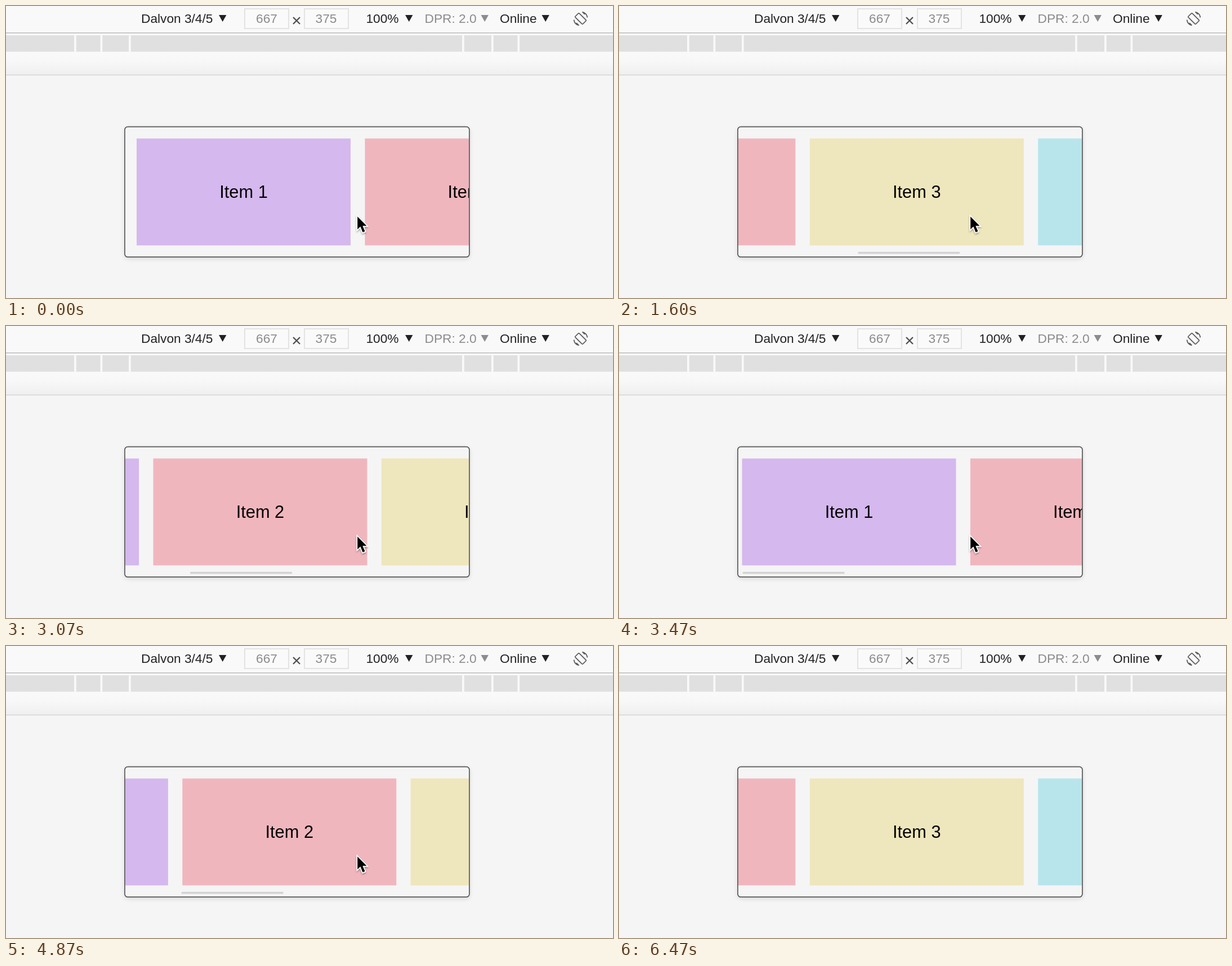
Recreate the animation shown at these times as an HTML page. Size 1078 by 519 pixels, loop 6.74 s.

```html
<!DOCTYPE html>
<html lang="en">
<head>
<meta charset="utf-8">
<title>Scrolling items</title>
<style>
  html, body { margin: 0; width: 100%; height: 100%; overflow: hidden; background: #f5f5f5; }
  svg { display: block; width: 100vw; height: 100vh; }
  text { font-family: "Liberation Sans", Arial, sans-serif; }
  .bar { font-size: 22.7px; fill: #222; }
  .bar .dim { fill: #8c8c8c; }
  .mid, .item { text-anchor: middle; }
  .item { font-size: 30.8px; fill: #000; }
  .box { fill: #fafafa; stroke: #e3e3e3; stroke-width: 2; }
  .icon { fill: none; stroke: #5a5a5a; stroke-width: 1.7; }
</style>
</head>
<body>
<svg viewBox="0 0 1078 519" preserveAspectRatio="none">
  <defs>
    <linearGradient id="fade" x2="0" y2="1">
      <stop offset="0" stop-color="#fafafa"/>
      <stop offset=".45" stop-color="#f7f7f7"/>
      <stop offset="1" stop-color="#efefef"/>
    </linearGradient>
    <clipPath id="view"><rect x="211" y="215" width="611.5" height="231" rx="5"/></clipPath>
    <filter id="soft" x="-10%" y="-10%" width="120%" height="130%">
      <feGaussianBlur stdDeviation="4"/>
    </filter>
    <filter id="drop" x="-50%" y="-50%" width="200%" height="200%">
      <feDropShadow dx="0" dy="2" stdDeviation="1.5" flood-opacity=".35"/>
    </filter>
  </defs>

  <rect width="1078" height="519" fill="#f5f5f5"/>
  <rect width="1078" height="82" fill="#f9f9f9"/>
  <rect y="47" width="1078" height="1.6" fill="#bebebe"/>
  <rect y="52" width="1078" height="29.5" fill="#e0e0e0"/>
  <g id="marks" fill="#f9f9f9"></g>
  <rect y="81.5" width="1078" height="41" fill="url(#fade)"/>
  <rect y="122" width="1078" height="1.2" fill="#cfcfcf"/>

  <g class="bar">
    <text x="240" y="29.7">Dalvon 3/4/5</text>
    <rect class="box" x="424" y="5" width="78" height="35"/>
    <rect class="box" x="530" y="5" width="78" height="35"/>
    <text class="dim mid" x="463" y="29.7">667</text>
    <text class="dim mid" x="568.5" y="29.7">375</text>
    <path d="M510 20 l12 12 m0 -12 l-12 12" stroke="#505050" stroke-width="2.4"/>
    <text x="639.5" y="29.7">100%</text>
    <text class="dim" x="743.5" y="29.7">DPR: 2.0</text>
    <text x="877" y="29.7">Online</text>
    <g id="arrows"></g>
  </g>
  <g class="icon" transform="translate(1020.5 22.5)">
    <rect x="-5" y="-9.5" width="10" height="19" rx="1.5" transform="rotate(-45)"/>
    <path d="M3 -12 A12.3 12.3 0 0 1 12 -2 M3 -12 l4.5 4.5 M-3 12 A12.3 12.3 0 0 1 -12 2 M-3 12 l-4.5 -4.5"/>
  </g>

  <rect x="211" y="217" width="612" height="232" rx="6" opacity=".13" filter="url(#soft)"/>
  <rect x="211" y="215" width="612" height="231" rx="5" fill="#f5f5f5"/>
  <g clip-path="url(#view)">
    <g id="track"></g>
    <rect id="thumb" y="437" width="181" height="3.6" rx="1" fill="#d3d3d3"/>
  </g>
  <rect x="210.9" y="214.6" width="612" height="231.6" rx="5.5" fill="none" stroke="#585858" stroke-width="1.7"/>

  <g id="cursor" filter="url(#drop)">
    <path d="M.7 .7 V23.5 L5.9 18.6 L10 28.8 L14 27.1 L9.8 17.3 H17 Z"
          stroke="#fff" stroke-width="3.2" paint-order="stroke"/>
  </g>
</svg>

<script>
const LOOP = 6740, STEP = 1000 / 15;
const PITCH = 405.4, END = 704;
const $ = id => document.getElementById(id);

$("marks").innerHTML = [121, 167.5, 218, 810, 862, 908.5]
  .map(x => `<rect x="${x}" y="52" width="3.7" height="29.5"/>`).join("");

$("arrows").innerHTML = [378, 709, 843.5, 951.5]
  .map((x, i) => `<path d="M${x} 16 h13.4 l-6.7 12 z" fill="${i === 2 ? "#8c8c8c" : "#222"}"/>`).join("");

$("track").innerHTML = ["#d5b8ee", "#f0b6be", "#eee6bc", "#b8e5ec"].map((color, i) => {
  const x = 232 + i * PITCH;
  return `<rect x="${x}" y="235.5" width="380" height="190" fill="${color}"/>
    <text class="item" x="${x + 190}" y="340.5">Item ${i + 1}</text>`;
}).join("");

const clamp = v => Math.max(0, Math.min(1, v));
const part = (t, from, to) => clamp((t - from) / (to - from));
const easeOut = x => 1 - Math.pow(1 - x, 2.4);
const mix = (a, b, x) => a + (b - a) * x;

// Each move: start, end, distance. Slow drags are followed by flicks.
const moves = [
  [130, 630, 14], [630, 1370, END - 14],
  [1800, 2814, -54], [2930, 3600, 54 - END],
  [4280, 4670, 15], [4670, 5565, END - 15]
];

const scrollAt = t => moves.reduce((sum, [from, to, d]) => sum + d * easeOut(part(t, from, to)), 0);

function thumbAlpha(t) {
  if (t < 60) return 0;
  if (t < 4270) return 1 - part(t, 3933, 4200);
  return 1 - part(t, 5933, 6200);
}

function cursorAt(t) {
  const out = part(t, 5933, 6200);
  const drop = part(t, 6333, 6467);
  return [mix(623.5, 969.5, out), mix(373.5, 466.5, out) + 60 * drop];
}

function draw(now) {
  const time = now % LOOP;
  const t = Math.floor((time + 5) / STEP) * STEP;
  const scroll = scrollAt(t);
  $("track").setAttribute("transform", `translate(${-scroll} 0)`);
  $("thumb").setAttribute("x", 215.5 + scroll * 0.2966);
  $("thumb").setAttribute("opacity", thumbAlpha(t));
  $("cursor").setAttribute("transform", `translate(${cursorAt(t)})`);
}

const start = performance.now();
function tick() {
  draw(performance.now() - start);
  requestAnimationFrame(tick);
}
tick();
</script>
</body>
</html>
```
